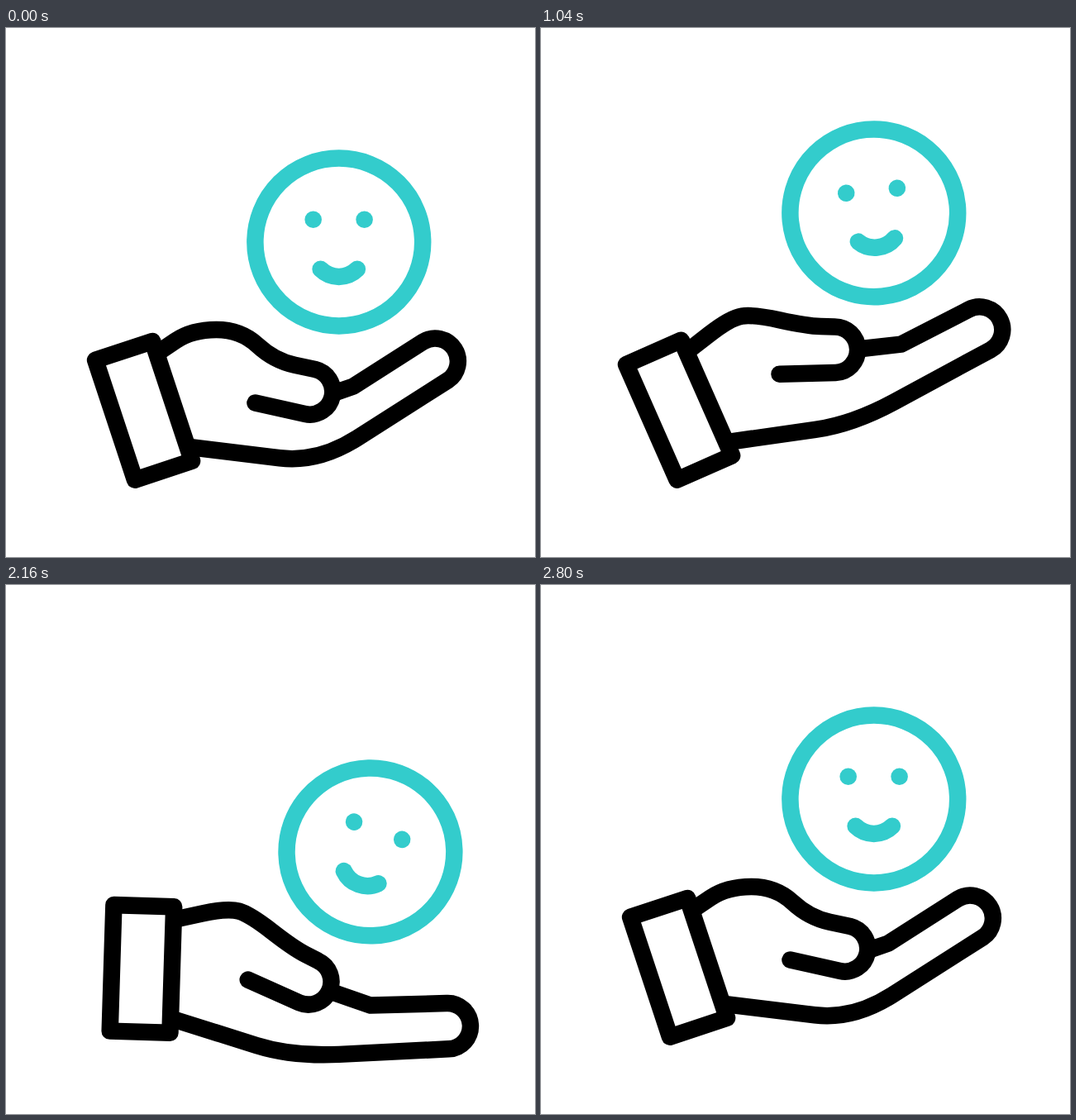
Animation, 640 px wide and 640 px high, one loop 3220 ms. Source, as an HTML page:

```html
<!DOCTYPE html>
<html lang="en">
<head>
<meta charset="utf-8">
<title>Hand and smiling ball</title>
<style>
  html, body { margin: 0; width: 100%; height: 100%; overflow: hidden; background: #fff; }
  svg { display: block; width: 100vw; height: 100vh; }
  g { fill: none; stroke-width: 20.5; stroke-linecap: round; stroke-linejoin: round; }
  #arm { stroke: #000; }
  #face { stroke: #3cc; }
  .eye { fill: #3cc; stroke: none; }
</style>
</head>
<body>
<svg viewBox="0 0 640 640">
  <g id="arm">
    <path id="thumb"/>
    <path id="palm"/>
    <rect x="130.2" y="386.5" width="72.8" height="152.6" transform="rotate(-18.3 166.6 462.8)"/>
  </g>
  <g id="face">
    <circle cx="402.8" cy="259" r="101.4"/>
    <circle class="eye" cx="371.7" cy="231.8" r="10.3"/>
    <circle class="eye" cx="433.6" cy="231.8" r="10.3"/>
    <path d="M380.6 291.8A31.5 31.5 0 0 0 424.9 291.8"/>
  </g>
</svg>
<script>
const LOOP = 3220, CYCLE = 1600, STEP = 20;
const TIP = 27.7;
const WRIST_TOP = [185, 392], WRIST_BASE = [222, 507];

const REST = { x: 0, y: 0, turn: 0 };
const LOW = { x: 38.2, y: 64, turn: 20.1 };
const HIGH = { x: 0, y: -64, turn: -10 };

// Key points of the hand; digits are a tip centre and a heading in degrees
const CURLED = {
  back: [[225, 365], [284, 365], [324.5, 402.5]],
  thumb: { at: [368, 440], angle: 12.6, reach: 62 },
  web: [420, 433.6],
  finger: { at: [519.5, 403], angle: -32.5 },
  heel: [378, 525.9]
};
const OPEN = {
  back: [[239, 357.8], [267, 356.1], [330.4, 376.5]],
  thumb: { at: [361.4, 408.2], angle: 4, reach: 68 },
  web: [441.6, 409.3],
  finger: { at: [537.7, 400.9], angle: -22.9 },
  heel: [374, 500.1]
};

const clamp = u => Math.min(1, Math.max(0, u));
const smooth = u => u * u * (3 - 2 * u);

// Cubic bezier (1/6, 0, 0, 1): quick start, long settling
function settle(u) {
  let lo = 0, hi = 1;
  for (let i = 0; i < 30; i++) {
    const s = (lo + hi) / 2;
    if (0.5 * (1 - s) * (1 - s) * s + s * s * s < u) lo = s; else hi = s;
  }
  return smooth(lo);
}

// Blends numbers, arrays and objects alike
function mix(a, b, k) {
  if (typeof a === "number") return a + (b - a) * k;
  if (Array.isArray(a)) return a.map((v, i) => mix(v, b[i], k));
  return Object.fromEntries(Object.keys(a).map(key => [key, mix(a[key], b[key], k)]));
}

const text = p => p.map(v => v.toFixed(2)).join(" ");

// Point at a distance along and across a digit's heading
function along(digit, forward, across) {
  const a = digit.angle * Math.PI / 180, c = Math.cos(a), s = Math.sin(a);
  return [digit.at[0] + forward * c - across * s, digit.at[1] + forward * s + across * c];
}

// Half circle from the upper to the lower side of a digit
const cap = digit =>
  `L${text(along(digit, 0, -TIP))}A${TIP} ${TIP} 0 0 1 ${text(along(digit, 0, TIP))}`;

// Line through points with softened corners; cut is the share taken off the end segments
function bend(points, cut) {
  const last = points.length - 1;
  let d = "L" + text(mix(points[1], points[0], cut));
  for (let i = 1; i < last; i++) {
    const share = i === last - 1 ? cut : 0.5;
    d += `Q${text(points[i])} ${text(mix(points[i], points[i + 1], share))}`;
  }
  return d + "L" + text(points[last]);
}

function thumbPath({ back, thumb }) {
  const top = along(thumb, 0, -TIP);
  return `M${text(WRIST_TOP)}${bend([WRIST_TOP, ...back, top], 0.5)}${cap(thumb)}` +
    `L${text(along(thumb, -thumb.reach, TIP))}`;
}

function palmPath({ thumb, web, finger, heel }) {
  const root = [thumb.at[0] + TIP, thumb.at[1] + 2];
  const under = along(finger, 0, TIP);
  return `M${text(root)}L${text(web)}${cap(finger)}${bend([under, heel, WRIST_BASE], 0.3)}`;
}

function poseAt(t) {
  if (t < 600) return mix(REST, LOW, settle(t / 600));
  if (t < 900) return mix(LOW, HIGH, smooth((t - 600) / 300));
  return mix(HIGH, REST, smooth(clamp((t - 900) / 300)));
}

// The hand opens on the first drop and curls again at the end of the second
function openness(t) {
  return t < CYCLE ? settle(clamp(t / 600)) : 1 - smooth(clamp((t - CYCLE - 900) / 300));
}

const set = (id, name, value) => document.getElementById(id).setAttribute(name, value);

function draw(time) {
  const t = Math.floor((time % LOOP) / STEP) * STEP;
  const { x, y, turn } = poseAt(t % CYCLE);
  const hand = mix(CURLED, OPEN, openness(t));
  set("thumb", "d", thumbPath(hand));
  set("palm", "d", palmPath(hand));
  set("arm", "transform", `rotate(${turn} 160.8 457.5)`);
  set("face", "transform", `translate(${x} ${y}) rotate(${turn} 402.8 259)`);
}

let start;
function tick(now) {
  if (start === undefined) start = now;
  draw(Math.max(0, now - start));
  requestAnimationFrame(tick);
}
draw(0);
requestAnimationFrame(tick);
</script>
</body>
</html>
```
